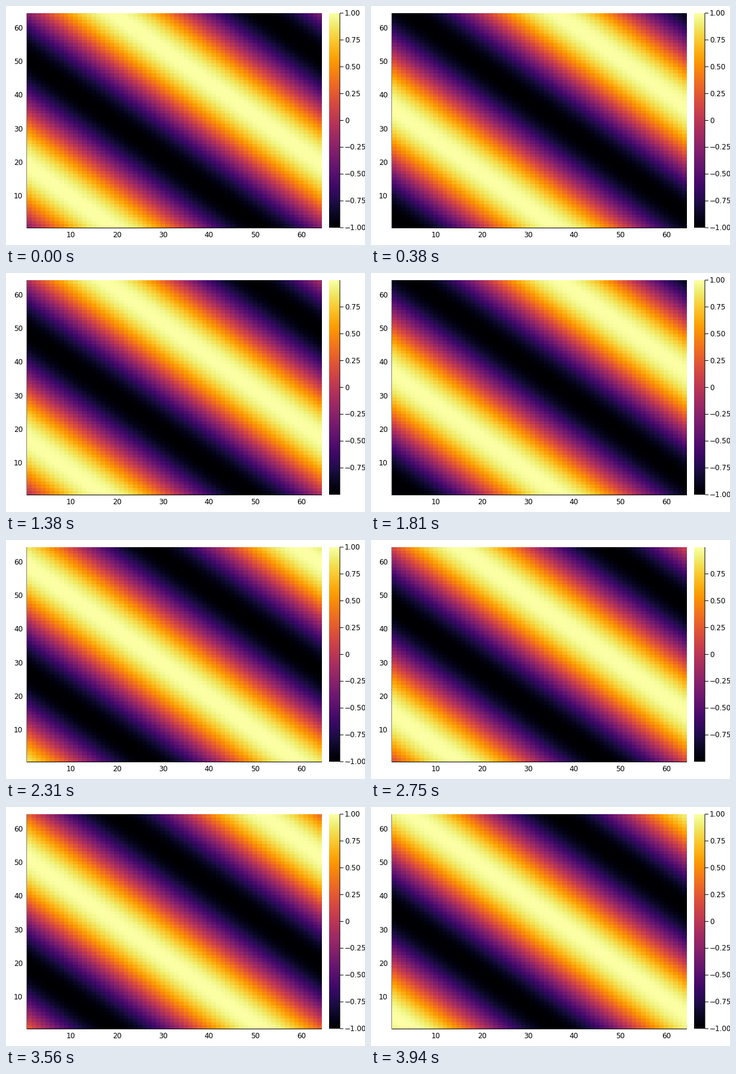
Animation of 600 by 400 pixels, one loop 4 s. Source, as a matplotlib script:

```python
import math

import numpy as np
import matplotlib.pyplot as plt
from matplotlib.animation import FuncAnimation

W, H, DPI = 600, 400, 100
N = 64                          # cells per side
STEPS, LOOP_MS, TICK_MS = 64, 4000, 10
LEFT, RIGHT, TOP, BOTTOM = 35.4, 528, 12, 371
BAR_L, BAR_R = 540, 558
SPEED = N / math.pi * math.atan(math.sqrt(2) * math.pi / 32)  # cells per step
START = 17 + SPEED
END_TICK_MIN = 0.99942          # peak needed for the +-1 ticks to appear

plt.rcParams["font.family"] = "DejaVu Sans"
fig = plt.figure(figsize=(W / DPI, H / DPI), dpi=DPI, facecolor="white")
ax = fig.add_axes([0, 0, 1, 1])
ax.axis("off")

PX = 72 / DPI
cells = np.arange(1, N + 1)
diag = cells[:, None] + cells[None, :]


def wave(step):
    return np.cos(2 * np.pi / N * (diag - START - SPEED * step))


def line(xs, ys, zorder):
    return ax.plot(xs, ys, color="black", lw=PX, solid_capstyle="butt",
                   snap=False, zorder=zorder)[0]


def label(x, y, s, ha):
    return ax.text(x, y, s, fontsize=12 * PX, ha=ha, va="center", color="black")


def image(data, extent):
    return ax.imshow(data, cmap="inferno", origin="lower", extent=extent,
                     aspect="auto", interpolation="nearest", zorder=2)


heat = image(wave(0), (LEFT, RIGHT, BOTTOM, TOP))
image(np.linspace(-1, 1, 256)[:, None], (BAR_L, BAR_R, BOTTOM, TOP))
ax.set_xlim(0, W)
ax.set_ylim(H, 0)

# The heatmap covers the inner half of its axis lines.
line([35, 35], [TOP, BOTTOM + 1], 1)
line([35, RIGHT], [BOTTOM + 0.5] * 2, 1)
line([BAR_R, BAR_R], [TOP, BOTTOM], 3)

for v in range(10, 61, 10):
    frac = (v - 0.5) / N
    label(LEFT + frac * (RIGHT - LEFT), 383.5, str(v), "center")
    label(28, BOTTOM + 0.5 - frac * (BOTTOM - TOP), str(v), "right")

ticks = []
for v in np.linspace(-1, 1, 9):
    text = f"{v:.2f}".replace("-", "\u2212") if v else "0"
    ticks.append((v, line([BAR_R, BAR_R + 6], [0, 0], 3), label(566, 0, text, "left")))


def update(k):
    # The picture holds between steps; changes fall on the nearest clock tick.
    step = math.ceil((k + 0.5) * TICK_MS * STEPS / LOOP_MS) - 1
    data = wave(step)
    peak = data.max()
    heat.set_data(data)
    heat.set_clim(-peak, peak)
    mid, half = (TOP + BOTTOM) / 2, (BOTTOM - TOP) / 2
    for v, mark, text in ticks:
        y = mid - v / peak * half
        shown = abs(v) < 1 or peak >= END_TICK_MIN
        mark.set_ydata([y, y])
        text.set_y(y + 0.5)
        mark.set_visible(shown)
        text.set_visible(shown)
    return [heat]


anim = FuncAnimation(fig, update, frames=LOOP_MS // TICK_MS, interval=TICK_MS,
                     repeat=True, repeat_delay=0, blit=False)
plt.show()
```
